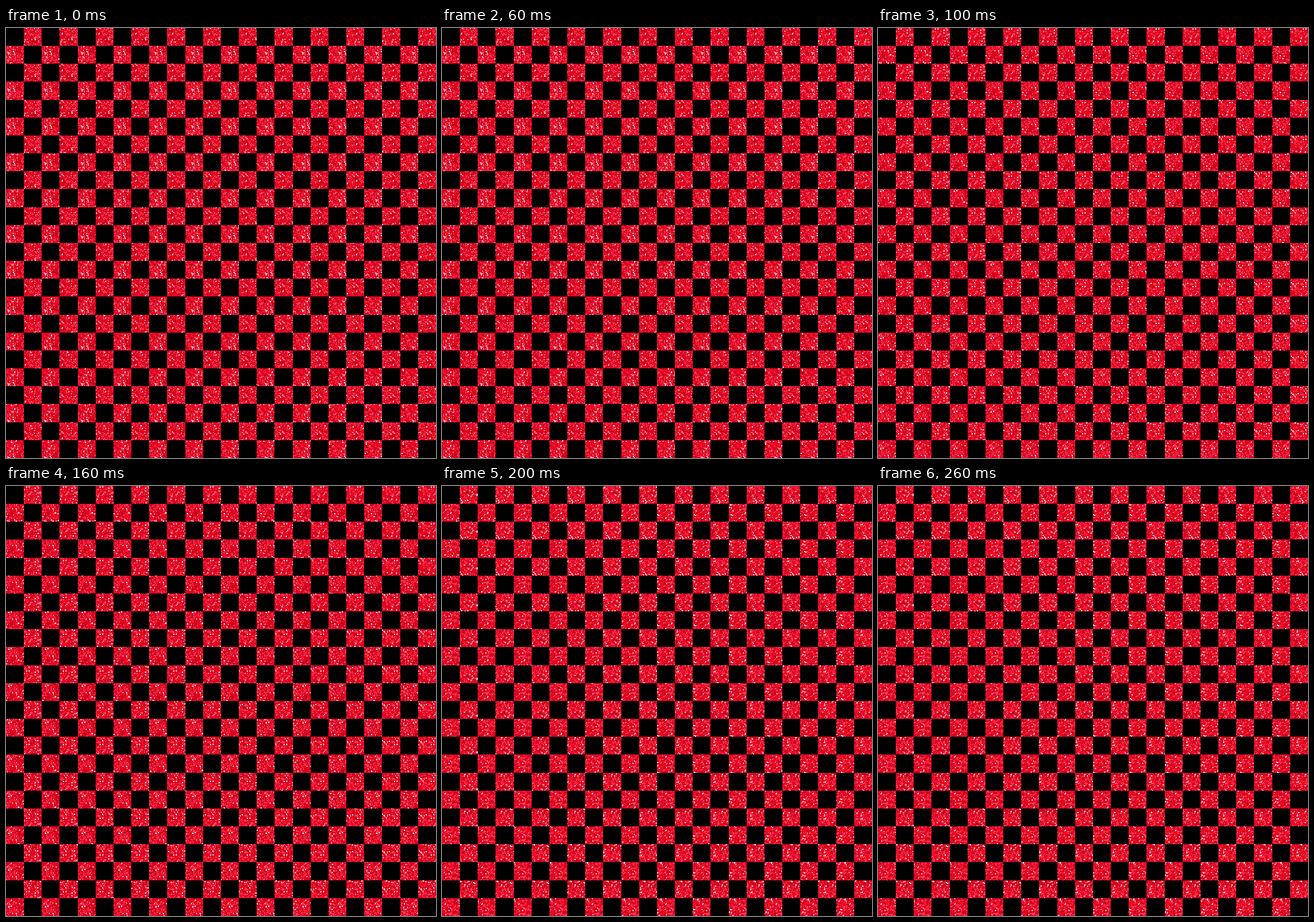
Write an HTML page with a canvas that moves like this. It is 748 px wide and 748 px high and loops after 300 ms.

```html
<!DOCTYPE html>
<html lang="en">
<head>
<meta charset="utf-8">
<title>Red glitter checkerboard</title>
<style>
  html, body { margin: 0; width: 100%; height: 100%; overflow: hidden; background: #000; }
  canvas { display: block; position: absolute; left: 0; top: 0; }
</style>
</head>
<body>
<script>
const SIZE = 748, CELLS = 24, POSES = 3, TILE = 64, LOOP = 300;

function seeded(seed) {
  return () => {
    seed = (seed + 0x6D2B79F5) | 0;
    let t = Math.imul(seed ^ (seed >>> 15), 1 | seed);
    t = (t + Math.imul(t ^ (t >>> 7), 61 | t)) ^ t;
    return ((t ^ (t >>> 14)) >>> 0) / 4294967296;
  };
}

// Each layer: colour, opacity, count, largest speck side
const layers = [
  ['#b00018', 0.35, 110, 7],
  ['#ff0a28', 0.5, 80, 5],
  ['#a80014', 0.6, 420, 2],
  ['#ff2040', 0.7, 300, 2],
  ['#ff6078', 0.75, 200, 2],
  ['#ffb0bc', 0.9, 120, 1],
  ['#ffffff', 1, 55, 2]
];

function makeCanvas(size) {
  const canvas = document.createElement('canvas');
  canvas.width = canvas.height = size;
  return canvas;
}

function glitter(seed) {
  const rand = seeded(seed);
  const pick = n => Math.floor(rand() * n);
  const tile = makeCanvas(TILE);
  const g = tile.getContext('2d');
  g.fillStyle = '#e6001e';
  g.fillRect(0, 0, TILE, TILE);
  for (const [colour, alpha, count, side] of layers) {
    g.fillStyle = colour;
    g.globalAlpha = alpha;
    for (let i = 0; i < count; i++) {
      g.fillRect(pick(TILE), pick(TILE), 1 + pick(side), 1 + pick(side));
    }
  }
  // Soft cross-shaped sparkles
  for (let i = 0; i < 24; i++) {
    const x = pick(TILE), y = pick(TILE);
    g.globalAlpha = 0.6;
    g.fillRect(x - 1, y, 3, 1);
    g.fillRect(x, y - 1, 1, 3);
    g.globalAlpha = 1;
    g.fillRect(x, y, 1, 1);
  }
  return tile;
}

// Half pixels round down
const edge = i => Math.ceil(i * SIZE / CELLS - 0.5);

function board(seed) {
  const canvas = makeCanvas(SIZE);
  const ctx = canvas.getContext('2d');
  ctx.fillRect(0, 0, SIZE, SIZE);
  ctx.fillStyle = ctx.createPattern(glitter(seed), 'repeat');
  for (let row = 0; row < CELLS; row++) {
    for (let col = (row + 1) % 2; col < CELLS; col += 2) {
      const x = edge(col), y = edge(row);
      ctx.fillRect(x, y, edge(col + 1) - x, edge(row + 1) - y);
    }
  }
  return canvas;
}

for (let pose = 0; pose < POSES; pose++) {
  const canvas = document.body.appendChild(board(41 + pose * 977));
  const steps = Array.from({ length: POSES }, (_, i) => ({
    opacity: i === pose ? 1 : 0,
    offset: i / POSES,
    easing: 'step-end'
  }));
  steps.push({ opacity: pose === 0 ? 1 : 0, offset: 1 });
  canvas.animate(steps, { duration: LOOP, iterations: Infinity });
}
</script>
</body>
</html>
```
